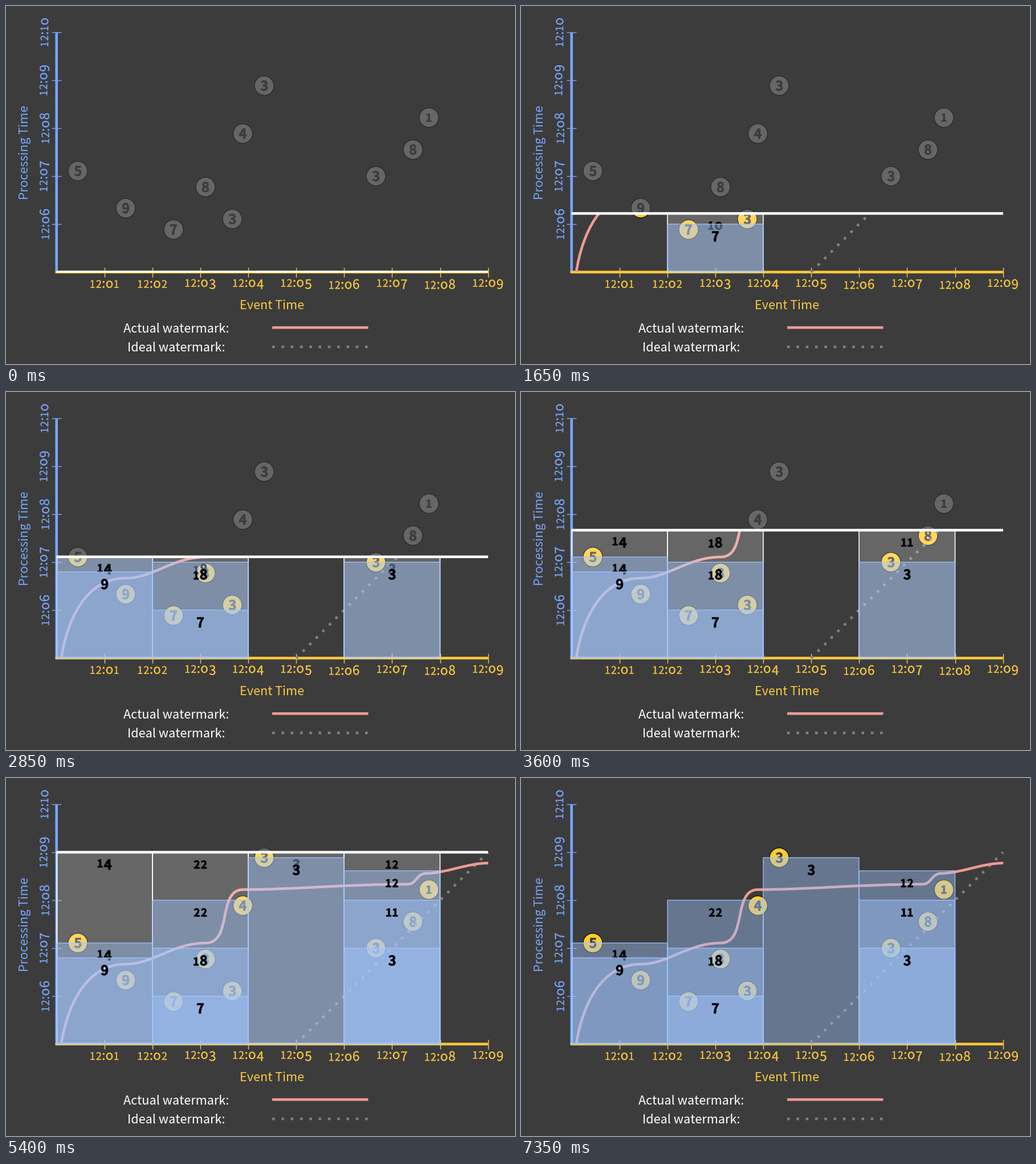
Write a matplotlib script that moves like this. It is 893x627 px and loops after 8 s.

```python
import matplotlib.pyplot as plt
from matplotlib.animation import FuncAnimation
from matplotlib.patches import Circle, PathPatch, Rectangle
from matplotlib.path import Path
from matplotlib.textpath import TextPath
from matplotlib.transforms import Affine2D, Bbox, TransformedBbox

W, H = 893, 627
LEFT, RIGHT, BASE, TOP = 88.7, 845.7, 466, 46
MIN_X, MIN_Y = 84.1, 84
FONT = "Noto Sans CJK JP"
BG, BLUE, GOLD, PINK, DOTS = "#3c3c3c", "#77a5ff", "#fbc93d", "#ee9a94", "#808080"
YELLOW = (1.0, 0.8, 0.2)
PANEL = (160 / 255, 197 / 255, 1.0)
VEIL = 0.215
THICK = 4.6
DOTTED = (0, (1, 16.3 / THICK - 1))
STEP = 3          # animation frames per move of the time line
SWEEP, LAST = 45, 49

# x, y, value
EVENTS = [
    (126, 289, 5), (210, 354, 9), (294, 391.5, 7), (350, 317, 8),
    (397, 373, 3), (415.5, 223.5, 4), (453, 139.5, 3), (649, 298, 3),
    (714, 251.5, 8), (742, 195.5, 1),
]

# left, right, emitted results as (top, value) in order of time
WINDOWS = [
    (89, 257, [(315, 9), (289, 14)]),
    (257, 425, [(382, 7), (298, 18), (214, 22)]),
    (425, 593, [(139.5, 3)]),
    (593, 761.5, [(298, 3), (214, 11), (162.5, 12)]),
]

WATERMARK = [
    (97, 466), (107, 400), (140, 326), (210, 326),
    (258, 326), (293, 289), (350, 289),
    (398, 289), (370, 195.5), (416, 195.5),
    (500, 195.5), (600, 186), (705, 186),
    (720, 186), (720, 167), (738, 167),
    (770, 167), (810, 149), (846, 149),
]

fig = plt.figure(figsize=((W + 1e-6) / 72, (H + 1e-6) / 72), dpi=72, facecolor=BG)
ax = fig.add_axes([0, 0, 1, 1])
ax.set_xlim(0, W)
ax.set_ylim(H, 0)
ax.axis("off")

# everything below the time line has been seen
seen = Bbox([[0, BASE], [W, H]])
seen_clip = TransformedBbox(seen, ax.transData)
plot_clip = TransformedBbox(Bbox([[0, TOP - 1], [W, BASE + 1]]), ax.transData)


def figures(text, x, y, size, weight="normal", angle=0):
    """Old-style numerals, centred by their ink on (x, y)."""
    parts, pen = [], 0
    for ch in text:
        scale = 0.8 if ch in "12" else 1
        drop = -0.16 * size if ch in "34579" else 0
        glyph = TextPath((0, 0), "o" if ch == "0" else ch, size=size * scale,
                         prop={"family": FONT, "weight": weight})
        box = glyph.get_extents()
        parts.append(glyph.transformed(Affine2D().translate(pen - box.x0, drop)))
        pen += box.width + 3
    path = Path.make_compound_path(*parts)
    box = path.get_extents()
    move = Affine2D().translate(-(box.x0 + box.x1) / 2, -(box.y0 + box.y1) / 2)
    move.rotate_deg(angle).scale(1, -1).translate(x, y)
    return path.transformed(move)


def add_figures(text, x, y, color, z, angle=0):
    return ax.add_patch(PathPatch(figures(text, x, y, 22.5, angle=angle),
                                  fc=color, ec=color, lw=0.3, zorder=z))


def bold(value, x, y):
    return figures(str(value), x, y, 23.5, weight="bold")


def add_bold(value, x, y, color, z):
    return ax.add_patch(PathPatch(bold(value, x, y), fc=color, ec=color,
                                  lw=0.8, zorder=z))


def line(xs, ys, color, lw, z, **style):
    return ax.plot(xs, ys, color=color, lw=lw, zorder=z, snap=lw < 2,
                   solid_capstyle="butt", **style)[0]


def disc(x, y, value, fill, edge, ink, z):
    body = ax.add_patch(Circle((x, y), 17, fc=fill, ec=edge, lw=1.4, zorder=z))
    return body, add_bold(value, x, y, ink, z + 0.1)


def word(x, y, text, color, angle=0):
    ax.text(x, y, text, color=color, family=FONT, size=21.6, ha="center",
            va="baseline", rotation=angle, rotation_mode="anchor")


def draw_axes():
    line([LEFT, LEFT], [TOP, BASE + 1.5], BLUE, THICK, 1)
    line([LEFT - 2, RIGHT], [BASE, BASE], GOLD, THICK, 1.1)
    for n in range(5):
        y = TOP + n * MIN_Y
        line([80, 97], [y, y], BLUE, 1.4, 1)
        add_figures(f"12:{10 - n:02d}", 67.5, y, BLUE, 1, angle=90)
    for n in range(1, 10):
        x = LEFT + n * MIN_X
        line([x, x], [458, 475], GOLD, 1.4, 1.1)
        add_figures(f"12:{n:02d}", x, 487, GOLD, 1)
    word(39, 256, "Processing Time", BLUE, 90)
    word(467, 531, "Event Time", GOLD)


def draw_legend():
    word(299, 571.5, "Actual watermark:", "white")
    word(299, 605, "Ideal watermark:", "white")
    line([467, 635.5], [563.2, 563.2], PINK, THICK, 1)
    line([467, 635.5], [597, 597], DOTS, THICK, 1, ls=DOTTED)


def draw_watermarks():
    codes = [Path.MOVETO] + [Path.CURVE4] * (len(WATERMARK) - 1)
    actual = ax.add_patch(PathPatch(Path(WATERMARK, codes), fc="none", ec=PINK,
                                    lw=THICK, capstyle="butt", zorder=4))
    ideal = line([509, RIGHT], [BASE, 130], DOTS, THICK, 3.9, ls=DOTTED)
    for art in (actual, ideal):
        art.set_clip_box(seen_clip)


def draw_events():
    for x, y, value in EVENTS:
        disc(x, y, value, "#666666", "#2c2c2c", BG, 2)
        for art in disc(x, y, value, YELLOW, "#151515", BG, 3):
            art.set_clip_box(seen_clip)


class Window:
    def __init__(self, left, right, results):
        self.mid = (left + right) / 2
        self.events = [(y, v) for x, y, v in EVENTS if left < x < right]
        self.veil = ax.add_patch(Rectangle((left, BASE), right - left, 0,
                                           lw=1.6, snap=False, zorder=5))
        self.label = add_bold(0, self.mid, BASE, "black", 6)
        self.panes = []
        # newer results slide in beneath the older ones
        for n, (top, value) in enumerate(results):
            z = 7 - n * 0.2
            pane = ax.add_patch(Rectangle(
                (left, top), right - left, BASE - top, fc=PANEL + (0.43,),
                ec=PANEL + (0.9,), lw=1.4, snap=False, zorder=z))
            text = add_bold(value, self.mid, top + 21.5, "black", z + 0.1)
            self.panes.append((top, pane, text))

    def update(self, now, fade):
        arrived = [v for y, v in self.events if now <= y]
        shown = bool(arrived) and fade > 0
        self.veil.set_visible(shown)
        self.label.set_visible(shown)
        if shown:
            self.veil.set_y(now)
            self.veil.set_height(BASE - now)
            self.veil.set_facecolor((1, 1, 1, VEIL * fade))
            self.veil.set_edgecolor((1, 1, 1, fade))
            self.label.set_path(bold(sum(arrived), self.mid, now + 21.5))
            self.label.set_alpha(fade)
        for top, pane, text in self.panes:
            pane.set_visible(now <= top)
            text.set_visible(now <= top)


draw_axes()
draw_legend()
draw_watermarks()
draw_events()
windows = [Window(*w) for w in WINDOWS]
time_line = line([LEFT, RIGHT], [BASE, BASE], "white", THICK, 10)
time_line.set_clip_box(plot_clip)


def update(frame):
    step = min(frame // STEP, LAST)
    now = BASE - min(step, SWEEP) * MIN_Y / 9
    fade = min(1, (LAST - step) / (LAST - SWEEP))
    seen.y0 = now
    time_line.set_ydata([now, now])
    time_line.set_alpha(fade)
    for window in windows:
        window.update(now, fade)


anim = FuncAnimation(fig, update, frames=160, interval=50, repeat=True)
plt.show()
```
